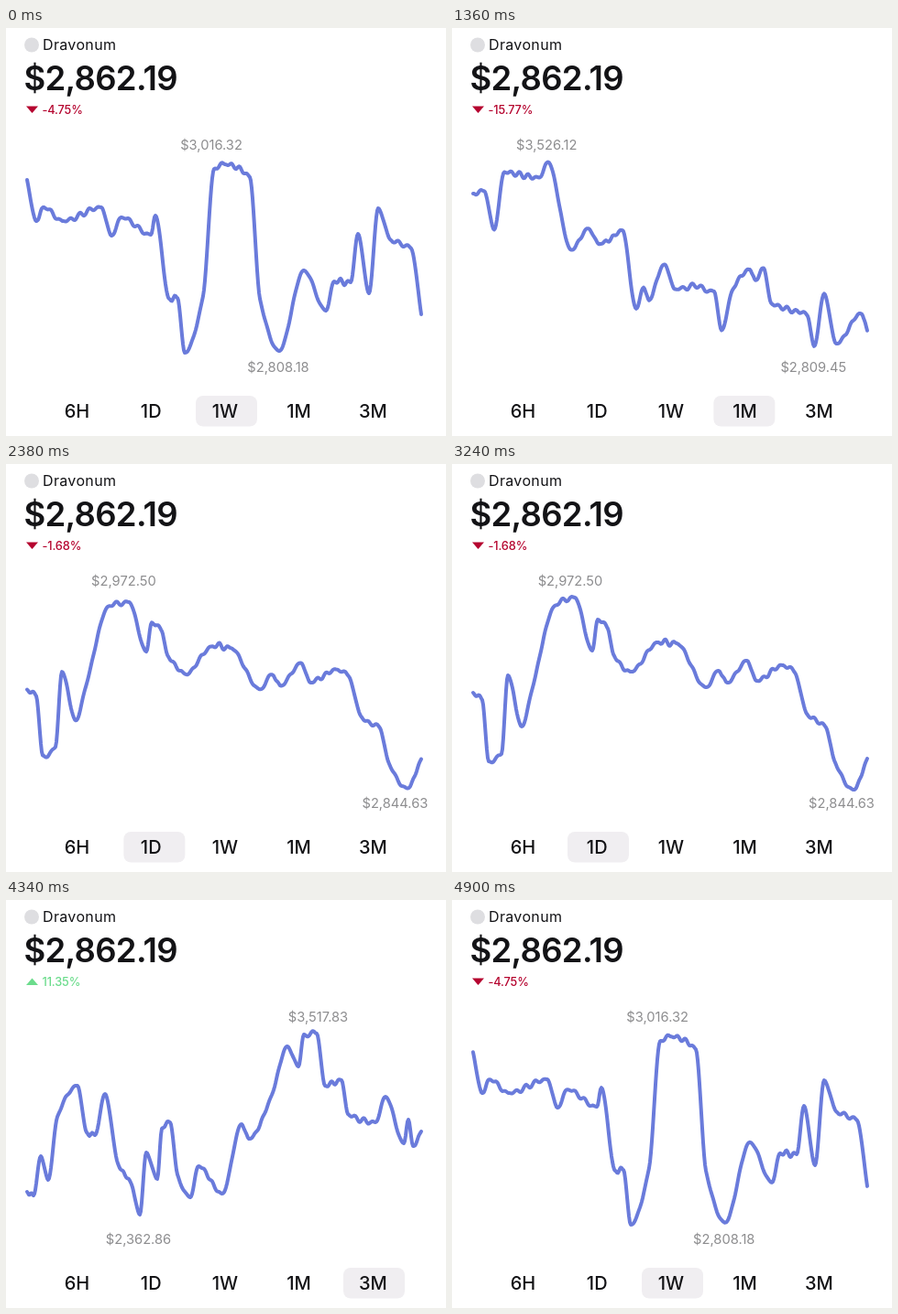
An HTML page that plays this animation: 480 px wide and 446 px high, repeating every 4930 ms.

```html
<!DOCTYPE html>
<html lang="en">
<head>
<meta charset="utf-8">
<title>Price chart</title>
<style>
  html, body { margin: 0; width: 100%; height: 100%; overflow: hidden; background: #fff; }
  svg { display: block; width: 100vw; height: 100vh; font-family: Inter, sans-serif; fill: #131316; }
  .price { font-size: 36.5px; font-weight: 600; letter-spacing: -.7px; }
  .name { font-size: 16px; letter-spacing: .35px; }
  .change { font-size: 12.8px; font-weight: 500; letter-spacing: -.15px; }
  .label { font-size: 14.7px; fill: #8d8d8f; text-anchor: middle; }
  .tab { font-size: 20px; font-weight: 500; text-anchor: middle; }
  #line { fill: none; stroke: #6a7bdb; stroke-width: 4; stroke-linecap: round; stroke-linejoin: round; }
</style>
</head>
<body>
<svg viewBox="0 0 480 446">
  <circle cx="28" cy="18.5" r="8" fill="#dedee1"/>
  <text class="name" x="40" y="24">Dravonum</text>
  <text class="price" x="19.5" y="67.5">$2,862.19</text>
  <g id="trend">
    <path id="arrow"/>
    <text id="change" class="change" x="39.5" y="94"></text>
  </g>
  <text id="high" class="label" y="132.5"></text>
  <text id="low" class="label" y="375.5"></text>
  <path id="line"/>
  <rect id="pill" y="402" width="67" height="33.5" rx="8" fill="#f0eef1"/>
  <g id="tabs"></g>
</svg>
<script>
const LOOP = 4930, STEP = 20, X0 = 23, X1 = 453;
const $ = id => document.getElementById(id);

// Smooth curve through key points "x,y", with a fine ripple on the longer, flatter stretches.
function trace(keys) {
  const pts = keys.split(' ').map(p => p.split(',').map(Number));
  const last = pts.length - 1;
  const slope = i => (pts[i + 1][1] - pts[i][1]) / (pts[i + 1][0] - pts[i][0]);
  const tangent = i => {
    if (i === 0 || i === last) return slope(Math.max(0, i - 1));
    const a = slope(i - 1), b = slope(i);
    return a * b > 0 ? 2 * a * b / (a + b) : 0;
  };
  const ys = [];
  for (let x = X0, i = 0; x <= X1; x++) {
    while (x > pts[i + 1][0]) i++;
    const [xa, ya] = pts[i], [xb, yb] = pts[i + 1];
    const h = xb - xa, u = (x - xa) / h, v = 1 - u;
    const base = v * v * ((1 + 2 * u) * ya + u * h * tangent(i)) +
                 u * u * ((1 + 2 * v) * yb - v * h * tangent(i + 1));
    const waves = Math.round(h / 10);
    const ripple = 4 / (1 + Math.abs(slope(i))) * Math.sin(Math.PI * u) * Math.sin(2 * Math.PI * waves * u);
    ys.push(base + ripple);
  }
  return ys;
}

const view = (tab, change, high, highX, low, lowX, keys) =>
  ({ tab, change, high, highX, low, lowX, ys: trace(keys) });

const week = view(240.5, '-4.75%', '$3,016.32', 224, '$2,808.18', 297,
  '23,166 33,211 41,196 62,211 104,196 115,227 126,207 158,226 163,205 178,296 187,295 195,355 ' +
  '215,293 227,154 239,149 266,163 277,296 298,353 325,265 349,309 358,277 376,278 384,225 ' +
  '396,290 406,197 419,231 442,241 453,313');
const month = view(320.5, '-15.77%', '$3,526.12', 100, '$2,809.45', 397,
  '23,182 35,176 46,222 57,154 95,161 105,143 130,245 149,219 161,238 186,216 201,304 209,281 ' +
  '215,298 232,266 243,295 286,285 294,329 306,283 325,264 331,276 340,260 348,300 388,320 ' +
  '395,352 406,297 419,353 447,316 453,332');
const day = view(159.5, '-1.68%', '$2,972.50', 129, '$2,844.63', 425,
  '23,250 33,258 40,325 54,317 61,231 76,287 87,248 112,155 134,146 153,204 159,170 170,180 ' +
  '176,208 195,227 225,195 245,196 277,244 291,226 300,239 322,215 332,237 361,220 374,228 ' +
  '387,273 408,288 417,324 438,356 453,322');
const quarter = view(401.5, '11.35%', '$3,517.83', 340.5, '$2,362.86', 144.5,
  '23,319 30,323 38,280 46,306 56,237 78,203 88,254 97,257 108,212 122,288 137,311 146,344 ' +
  '153,276 165,305 170,250 179,243 187,300 201,325 210,291 236,321 257,245 265,261 290,213 ' +
  '307,160 319,182 325,147 339,146 348,203 366,197 373,234 403,243 414,215 434,266 439,240 ' +
  '444,269 453,253');

const moves = [
  { at: 1140, from: week, to: month },
  { at: 2140, from: month, to: day },
  { at: 3300, from: day, to: quarter },
  { at: 4400, from: quarter, to: week }
];

$('tabs').innerHTML = ['6H', '1D', '1W', '1M', '3M']
  .map((name, i) => `<text class="tab" x="${77.5 + i * 80.7}" y="426">${name}</text>`).join('');

const settle = (t, tau, power) => 1 - Math.exp(-Math.pow(t / tau, power));
const mix = (a, b, p) => a + (b - a) * p;

function render(time) {
  const t = Math.floor(time / STEP) * STEP;
  const move = moves.filter(m => t >= m.at).pop();
  const { from, to } = move || { from: week, to: week };
  const age = move ? t - move.at + STEP : 0;

  const curve = settle(age, 95.8, 1.09);
  const label = settle(age, 43.4, .753);
  const slide = settle(age, 65, 1.04);

  $('line').setAttribute('d', 'M' + to.ys.map((y, i) =>
    `${X0 + i} ${mix(from.ys[i], y, curve).toFixed(2)}`).join('L'));
  $('pill').setAttribute('x', mix(from.tab, to.tab, slide) - 33.5);
  $('high').setAttribute('x', mix(from.highX, to.highX, label));
  $('low').setAttribute('x', mix(from.lowX, to.lowX, label));
  $('high').textContent = to.high;
  $('low').textContent = to.low;

  const down = to.change[0] === '-';
  $('trend').setAttribute('fill', down ? '#b5042f' : '#6bdc8c');
  $('arrow').setAttribute('d', down ? 'M22 85.5H35L28.5 93Z' : 'M22 93H35L28.5 85.5Z');
  $('change').textContent = to.change;
}

const start = performance.now();
function tick() {
  render((performance.now() - start) % LOOP);
  requestAnimationFrame(tick);
}
tick();
</script>
</body>
</html>
```
